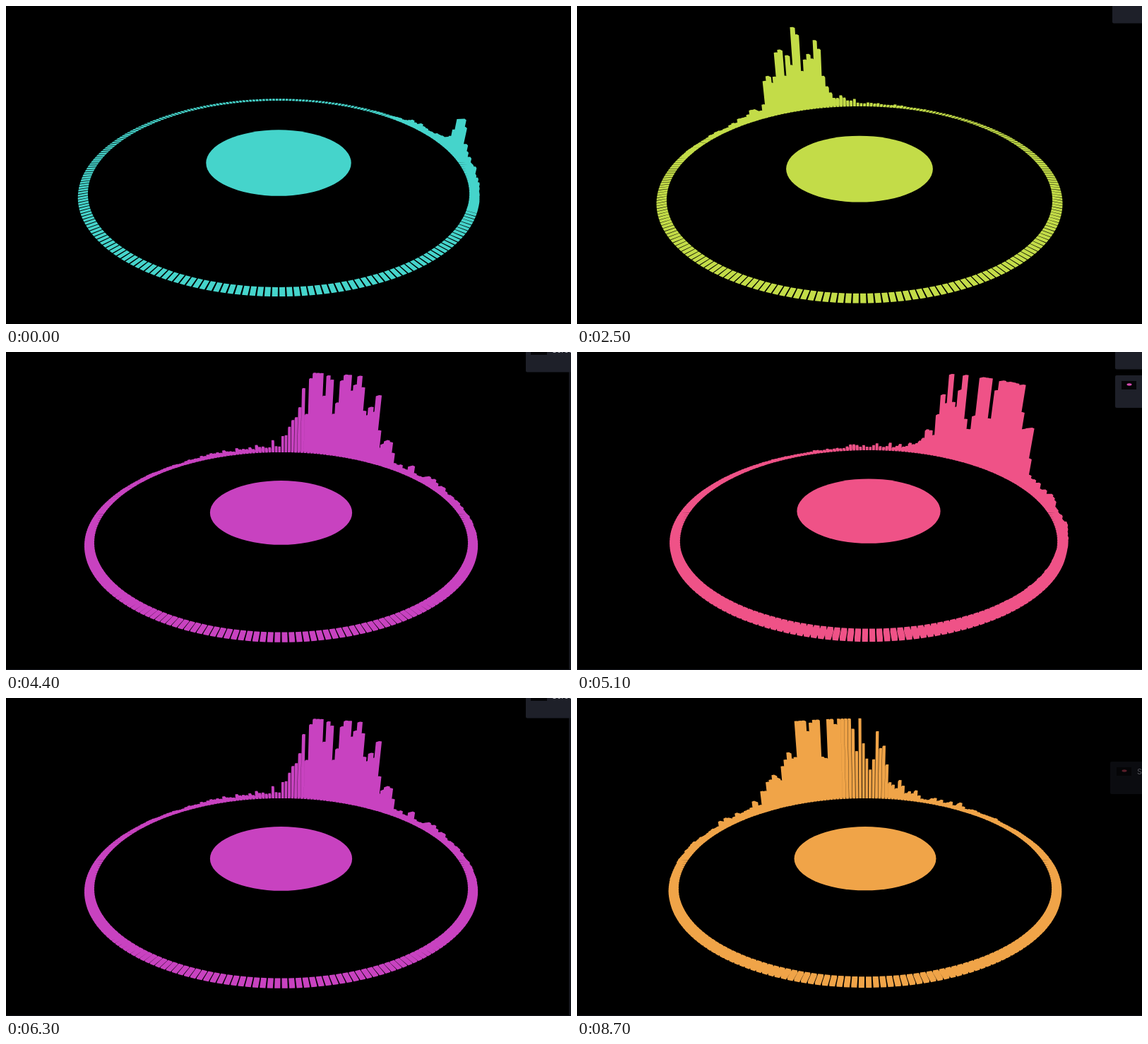
Recreate the animation shown at these times as an HTML page. Size 800 px wide and 450 px high, loop 8.8 s.

```html
<!DOCTYPE html>
<html lang="en">
<head>
<meta charset="utf-8">
<title>Circular spectrum</title>
<style>
html, body { margin: 0; width: 100%; height: 100%; overflow: hidden; background: #000; }
svg { display: block; width: 100vw; height: 100vh; }
text { font: 11px Inter, Arial, sans-serif; }
</style>
</head>
<body>
<svg id="stage" viewBox="0 0 800 450"></svg>
<script>
const NS = 'http://www.w3.org/2000/svg';
const LOOP = 8800, STEP = 100;
const BARS = 250, OUTER = 1.045, TILT = 0.367, CEILING = 0.6;
const PANEL = '#1e2029', EDGE = '#15161d';
const stage = document.getElementById('stage');

function add(parent, tag, attrs, text) {
  const el = document.createElementNS(NS, tag);
  for (const k in attrs) el.setAttribute(k, attrs[k]);
  if (text) el.textContent = text;
  parent.appendChild(el);
  return el;
}

const box = (x, y, width, height, fill, rx = 0) => g => add(g, 'rect', { x, y, width, height, fill, rx });
const dot = (cx, cy, r, fill) => g => add(g, 'circle', { cx, cy, r, fill });
const label = (x, y, fill, s) => g => add(g, 'text', { x, y, fill }, s);
const thumb = (x, y, color) => g => {
  box(x, y, 21, 12, '#050507')(g);
  add(g, 'ellipse', { cx: x + 11, cy: y + 5, rx: 3.5, ry: 1.7, fill: color });
};
const rightEdge = box(797, 4, 3, 446, EDGE);
const leftEdge = box(0, 0, 1, 450, EDGE);
const bottomEdge = box(0, 449, 800, 1, EDGE);

function random(seed) {
  const next = () => (seed = (seed * 16807) % 2147483647) / 2147483647;
  for (let i = 0; i < 5; i++) next();
  return next;
}

function hull(points) {
  const p = points.slice().sort((a, b) => a[0] - b[0] || a[1] - b[1]);
  const half = list => {
    const out = [];
    for (const c of list) {
      while (out.length > 1) {
        const [a, b] = out.slice(-2);
        if ((b[0] - a[0]) * (c[1] - a[1]) - (b[1] - a[1]) * (c[0] - a[0]) > 0) break;
        out.pop();
      }
      out.push(c);
    }
    out.pop();
    return out;
  };
  return half(p).concat(half(p.reverse()));
}

// Perspective view of a unit ring: k and ky are its horizontal and vertical scale.
function projector({ cx, cy, k, ky }) {
  const sin = ky / k, cos = Math.sqrt(1 - sin * sin), q = TILT / cos;
  return (x, y, z) => {
    const d = 1 + q * (z * cos - y * sin);
    return [cx + k * x / d, cy - k * (z * sin + y * cos) / d];
  };
}

// A flat-topped cluster of loud bars at one angle, with a skirt fading out on both sides.
function spectrum({ at, width, peak, skirt, spread, base, seed }) {
  const rnd = random(seed);
  let last = 0.5;
  return phi => {
    const gap = Math.abs(Math.atan2(Math.sin(phi - at), Math.cos(phi - at)));
    const jitter = 0.3 * last + 0.7 * (last = rnd());
    const loud = peak * Math.exp(-((gap / width) ** 4)) * (0.35 + 1.2 * jitter);
    const quiet = skirt * Math.exp(-((gap / spread) ** 2)) * (0.15 + jitter * jitter);
    return Math.min(CEILING, loud + quiet + base * (1 - 0.7 * Math.sin(phi)));
  };
}

function scene(color, view, sound, extras = []) {
  const project = projector(view), height = spectrum(sound);
  const g = add(stage, 'g', { display: 'none' });
  const w = 0.8 * Math.PI / BARS;
  let path = '';
  for (let i = 0; i < BARS; i++) {
    const phi = -Math.PI / 2 + (i + 0.5) * 2 * Math.PI / BARS;
    const c = Math.cos(phi), s = Math.sin(phi), h = height(phi), pts = [];
    for (const r of [1, OUTER])
      for (const t of [-w, w])
        for (const y of [0, h]) pts.push(project(r * c - t * s, y, r * s + t * c));
    path += 'M' + hull(pts).map(p => p.map(v => v.toFixed(2)).join(' ')).join('L') + 'Z';
  }
  add(g, 'path', { d: path, fill: color });
  const { cx, cy, k, ky } = view;
  add(g, 'ellipse', { cx, cy: cy + 0.04 * ky, rx: 0.409 * k, ry: 0.409 * ky, fill: color });
  extras.forEach(draw => draw(g));
  return g;
}

const teal = scene('#45d4cb',
  { cx: 386, cy: 217.5, k: 251.2, ky: 114.2 },
  { at: 0.1, width: 0.06, peak: 0.16, skirt: 0.09, spread: 0.38, base: 0, seed: 11 });

const lime = scene('#c3dc48',
  { cx: 400, cy: 226, k: 254, ky: 114.8 },
  { at: 2.03, width: 0.22, peak: 0.36, skirt: 0.11, spread: 0.5, base: 0.001, seed: 23 },
  [box(758, -4, 46, 28.5, PANEL, 2)]);

const cyan = scene('#46c6d8',
  { cx: 397.5, cy: 231.1, k: 240.5, ky: 108.2 },
  { at: 1.72, width: 0.3, peak: 0.44, skirt: 0.12, spread: 0.85, base: 0.009, seed: 37 },
  [box(0, 0, 800, 4, PANEL), rightEdge, dot(790.5, -3, 4.5, '#5b4fc4')]);

const pink = scene('#ef5287',
  { cx: 413, cy: 220.7, k: 248.4, ky: 111.7 },
  { at: 0.7, width: 0.37, peak: 0.55, skirt: 0.14, spread: 0.85, base: 0.011, seed: 41 },
  [box(762, -4, 42, 28.5, PANEL, 2), box(762, 33, 42, 46, PANEL, 2), thumb(771, 41, '#d34bb0'),
   leftEdge, bottomEdge]);

const magenta = scene('#c842c0',
  { cx: 389.5, cy: 223, k: 246, ky: 110.8 },
  { at: 1.13, width: 0.33, peak: 0.55, skirt: 0.14, spread: 0.8, base: 0.003, seed: 53 },
  [rightEdge, box(736, -4, 68, 32.5, PANEL, 2), box(743, 0, 23, 4, '#050507'),
   label(773, 1, '#c8c9d0', 'Screen'), bottomEdge]);

const orange = scene('#f0a448',
  { cx: 408, cy: 222.8, k: 245.6, ky: 110.4 },
  { at: 1.83, width: 0.42, peak: 0.52, skirt: 0.16, spread: 0.85, base: 0.006, seed: 67 },
  [box(755, 90, 49, 46, '#0b0c10', 2), thumb(764, 98, '#5a1f2a'), label(793, 108, '#55565c', 'Scene'),
   bottomEdge]);

// Hard cuts between equally long stills, on a ten-per-second clock.
const show = [teal, lime, cyan, magenta, pink, magenta, orange];
let shown = null;
function render(ms) {
  const t = Math.floor((ms % LOOP) / STEP) * STEP;
  const now = show[Math.floor(t * show.length / LOOP)];
  if (now === shown) return;
  if (shown) shown.setAttribute('display', 'none');
  now.removeAttribute('display');
  shown = now;
}

const begin = performance.now();
function tick() {
  render(performance.now() - begin);
  requestAnimationFrame(tick);
}
tick();
</script>
</body>
</html>
```
